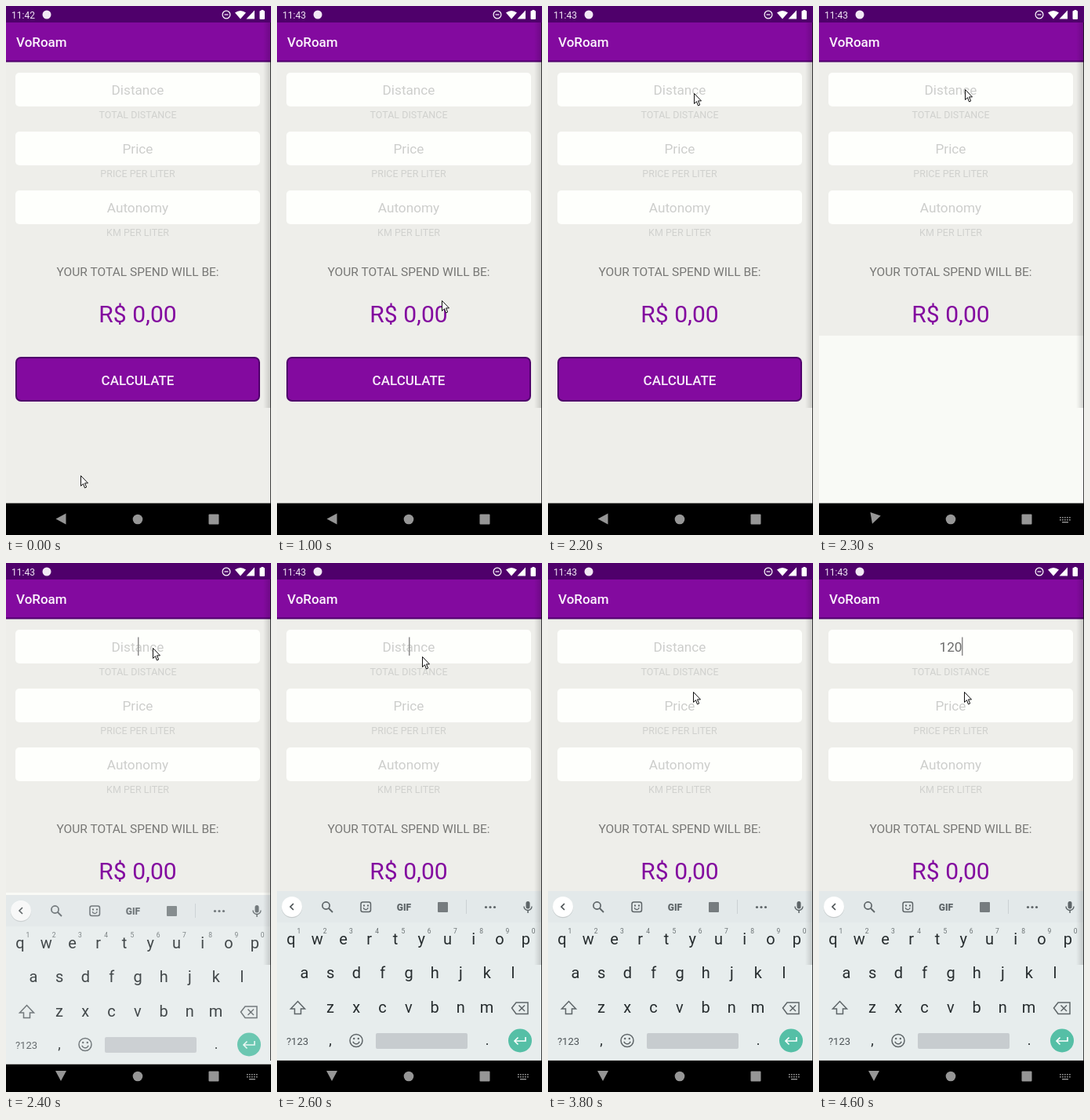
An HTML page with a canvas that plays this animation: 338x674 px, repeating every 5.1 s.

```html
<!DOCTYPE html>
<html lang="en">
<head>
<meta charset="utf-8">
<title>Trip cost calculator</title>
<style>
html, body { margin: 0; width: 100%; height: 100%; overflow: hidden; background: #000; }
canvas { display: block; width: 338px; height: 674px; }
</style>
</head>
<body>
<canvas id="stage" width="338" height="674"></canvas>
<script>
const ctx = document.getElementById('stage').getContext('2d');
const LOOP = 5100, STEP = 100;
const PURPLE = '#830a9f', DARK = '#4f006b', PAGE = '#eeeeea', BLANK = '#f9faf6';
const ICON = '#5e6568', KEY = '#262c2e';

const linear = k => k;
const easeIn = k => k ** 1.3;
const easeOut = k => 1 - (1 - k) ** 3;

// Pointer moves: from time, to time, start, end, easing
const MOVES = [
  [700, 1000, [95, 597], [210, 374], easeIn],
  [1000, 1600, [210, 374], [186, 114], easeOut],
  [2100, 2300, [186, 114], [186, 105], linear],
  [2300, 2400, [186, 105], [187, 107], linear],
  [2400, 3000, [187, 107], [181, 140], linear],
  [3000, 3600, [181, 140], [185, 163], linear]
];

function pointerAt(t) {
  const [from, to, a, b, ease] = MOVES.findLast(move => t >= move[0]) || MOVES[0];
  const k = ease(Math.min(1, Math.max(0, (t - from) / (to - from))));
  return a.map((value, i) => Math.round(value + (b[i] - value) * k));
}

function rect(x, y, w, h, color) {
  ctx.fillStyle = color;
  ctx.fillRect(x, y, w, h);
}

function paint(fill, stroke, line) {
  if (fill) { ctx.fillStyle = fill; ctx.fill(); }
  if (stroke) { ctx.strokeStyle = stroke; ctx.lineWidth = line; ctx.stroke(); }
}

function rounded(x, y, w, h, r, fill, stroke, line = 1) {
  ctx.beginPath();
  ctx.roundRect(x, y, w, h, r);
  paint(fill, stroke, line);
}

function arc(x, y, r, from, to, fill, stroke, line = 1) {
  ctx.beginPath();
  ctx.arc(x, y, r, from, to);
  paint(fill, stroke, line);
}

function circle(x, y, r, fill, stroke, line) {
  arc(x, y, r, 0, Math.PI * 2, fill, stroke, line);
}

function shape(points, fill, stroke, line = 1, closed = true) {
  ctx.beginPath();
  for (let i = 0; i < points.length; i += 2) ctx.lineTo(points[i], points[i + 1]);
  if (closed) ctx.closePath();
  paint(fill, stroke, line);
}

function text(str, x, y, size, color, weight = 400, align = 'center') {
  ctx.font = `${weight} ${size}px Roboto, sans-serif`;
  ctx.textAlign = align;
  ctx.fillStyle = color;
  ctx.fillText(str, x, y);
}

function drawStatusBar(clock) {
  rect(0, 0, 338, 21, DARK);
  text(clock, 7, 15.5, 12, '#f2e8f5', 400, 'left');
  circle(52, 11, 5.5, '#f2e8f5');
  circle(281, 11, 4.9, null, '#fff', 1.2);
  rect(278.5, 10.4, 5, 1.2, '#fff');
  ctx.beginPath();
  ctx.moveTo(299, 16.5);
  ctx.lineTo(292, 8.5);
  ctx.quadraticCurveTo(299, 3.5, 306, 8.5);
  ctx.closePath();
  paint('#fff');
  shape([317, 5.5, 317, 16.5, 306.5, 16.5], '#fff');
  rect(325.5, 5, 3, 2, '#fff');
  rounded(323.5, 6, 6.5, 11, 1, '#fff');
}

function drawAppBar() {
  rect(0, 21, 338, 50, PURPLE);
  rect(0, 69.5, 338, 2, DARK);
  text('VoRoam', 13, 52, 17, '#fbf3fc', 500, 'left');
}

function drawField(y, value, isHint, label) {
  rounded(12, y, 312, 43, 5, '#fefffc');
  text(value, 168, y + 28, 17.2, isHint ? '#cdcecc' : '#6b6b6b');
  text(label, 168, y + 58, 12.5, '#d0d1ce');
}

function drawForm(typed, caret, bottom) {
  rect(0, 71, 338, 563, BLANK);
  rect(0, 71, 338, bottom - 71, PAGE);
  drawField(85, typed || 'Distance', !typed, 'TOTAL DISTANCE');
  drawField(160, 'Price', true, 'PRICE PER LITER');
  drawField(235, 'Autonomy', true, 'KM PER LITER');
  if (caret) {
    ctx.font = '400 17.2px Roboto, sans-serif';
    rect(Math.round(168 + ctx.measureText(typed).width / 2), 94.5, 1.5, 23.5, '#8d8d8d');
  }
  text('YOUR TOTAL SPEND WILL BE:', 168, 344, 15.5, '#777775');
  text('R$ 0,00', 168, 403, 30, PURPLE);
  if (bottom > 504) {
    rounded(13, 448, 310, 55, 6, PURPLE, DARK, 2);
    text('CALCULATE', 168, 482.5, 17, '#f8edfa', 500);
  }
}

function drawEdge() {
  const shade = ctx.createLinearGradient(328, 0, 338, 0);
  shade.addColorStop(0, 'rgba(0,0,0,0)');
  shade.addColorStop(1, 'rgba(0,0,0,.17)');
  rect(328, 21, 10, 491, shade);
  rect(337, 21, 1, 613, 'rgba(20,20,20,.8)');
}

function drawNavBar(angle, hasKeyboard) {
  const gray = '#969696';
  rect(0, 633.5, 338, 41, '#000');
  ctx.save();
  ctx.translate(70, 653.5);
  ctx.rotate(angle);
  shape([-6.5, 0, 6.5, -7, 6.5, 7], gray);
  ctx.restore();
  circle(168, 654, 6.3, gray);
  rounded(258.5, 647.5, 13, 13, 1, gray);
  if (!hasKeyboard) return;
  for (let row = 0; row < 2; row++)
    for (let col = 0; col < 5; col++) rect(307 + col * 3, 651 + row * 3, 1.7, 1.5, gray);
  rect(310, 657, 8, 1.4, gray);
}

function drawToolbar() {
  rect(0, 418, 338, 40, '#e3e9ea');
  circle(19, 439, 13.2, 'rgba(0,0,0,.12)');
  circle(19, 438, 13, '#fff');
  shape([21, 434, 17, 438, 21, 442], null, '#444b4e', 1.6, false);
  circle(62.5, 436.5, 4.6, null, ICON, 1.7);
  shape([66, 440, 71, 445], null, ICON, 1.8, false);
  rounded(107, 432, 12.5, 12.5, 2.5, null, ICON, 1.5);
  rect(110, 435.5, 2, 2, ICON);
  rect(115, 435.5, 2, 2, ICON);
  arc(113.2, 438.5, 3, 0.2, Math.PI - 0.2, null, ICON, 1.3);
  text('GIF', 162, 442.5, 12, ICON, 900);
  rounded(205, 432, 13, 13, 1, '#767c7f');
  rect(241, 429, 1, 18, '#cbd1d3');
  for (const x of [266.5, 272, 277.5]) circle(x, 438.5, 1.6, ICON);
  rounded(317.5, 431, 5, 9.5, 2.5, ICON);
  arc(320, 437.5, 5, 0, Math.PI, null, ICON, 1.4);
  rect(319.3, 442, 1.5, 4, ICON);
}

function drawKeys() {
  const pitch = 33.25;
  [['qwertyuiop', 18, 486], ['asdfghjkl', 35, 529], ['zxcvbnm', 68, 572.5]].forEach(([row, x, y], r) => {
    [...row].forEach((letter, i) => {
      text(letter, x + i * pitch, y, 20, KEY);
      if (r === 0) text((i + 1) % 10, x + 10 + i * pitch, 472, 8.5, '#6a7173');
    });
  });
  shape([26.5, 558.5, 35.5, 568, 30.5, 568, 30.5, 574.5, 22.5, 574.5, 22.5, 568, 17.5, 568], null, ICON, 1.5);
  shape([299.5, 567, 305, 560, 320, 560, 320, 574.5, 305, 574.5], null, ICON, 1.5);
  shape([308.5, 563.5, 316, 571], null, ICON, 1.5, false);
  shape([316, 563.5, 308.5, 571], null, ICON, 1.5, false);
  text('?123', 26, 613.5, 13, '#4d5457');
  text(',', 68, 614, 18, KEY);
  circle(101, 608.5, 8, null, ICON, 1.5);
  circle(98.2, 606, 1.2, ICON);
  circle(103.8, 606, 1.2, ICON);
  arc(101, 608.5, 4.3, 0.3, Math.PI - 0.3, null, ICON, 1.5);
  rounded(126, 599, 117, 20, 2, '#c7cccf');
  text('.', 268, 614, 18, KEY);
  circle(310, 608.5, 15, '#55bfa6');
  shape([317, 604, 317, 609, 303.5, 609], null, '#fff', 1.6, false);
  shape([307.5, 604.5, 303, 609, 307.5, 613.5], null, '#fff', 1.6, false);
}

function drawKeyboard(offset, alpha) {
  ctx.save();
  ctx.translate(0, offset);
  rect(0, 418, 338, 215.5, BLANK);
  ctx.globalAlpha = alpha;
  rect(0, 418, 338, 215.5, '#e7eded');
  drawToolbar();
  drawKeys();
  ctx.restore();
}

function drawPointer(x, y) {
  ctx.save();
  ctx.translate(x + 0.5, y + 1.5);
  shape([0, 0, 0, 13, 3, 10.2, 5, 15.5, 7.2, 14.5, 5, 9.4, 9, 9.4], '#fff', '#111');
  ctx.restore();
}

function caretVisible(t) {
  if (t >= 4000) return true;
  return t >= 1400 && t < 3800 && Math.floor((t - 1400) / 500) % 2 === 0;
}

function draw(t) {
  const typed = '120'.slice(0, t < 4000 ? 0 : 1 + Math.floor((t - 4000) / 300));
  const opening = t >= 2300;
  const backAngle = !opening ? 0 : t < 2400 ? -1.25 : -Math.PI / 2;
  const slide = Math.max(0, 1 - (t - 2400) / 200);
  drawForm(typed, caretVisible(t), opening ? 420 : 634);
  drawStatusBar(t < 300 ? '11:42' : '11:43');
  drawAppBar();
  drawNavBar(backAngle, opening);
  if (t >= 2400) drawKeyboard(Math.round(5 * slide ** 2), 1 - 0.15 * slide);
  drawEdge();
  drawPointer(...pointerAt(t));
}

const start = performance.now();
function tick() {
  const t = (performance.now() - start) % LOOP;
  draw(Math.floor(t / STEP) * STEP);
  requestAnimationFrame(tick);
}
tick();
</script>
</body>
</html>
```
